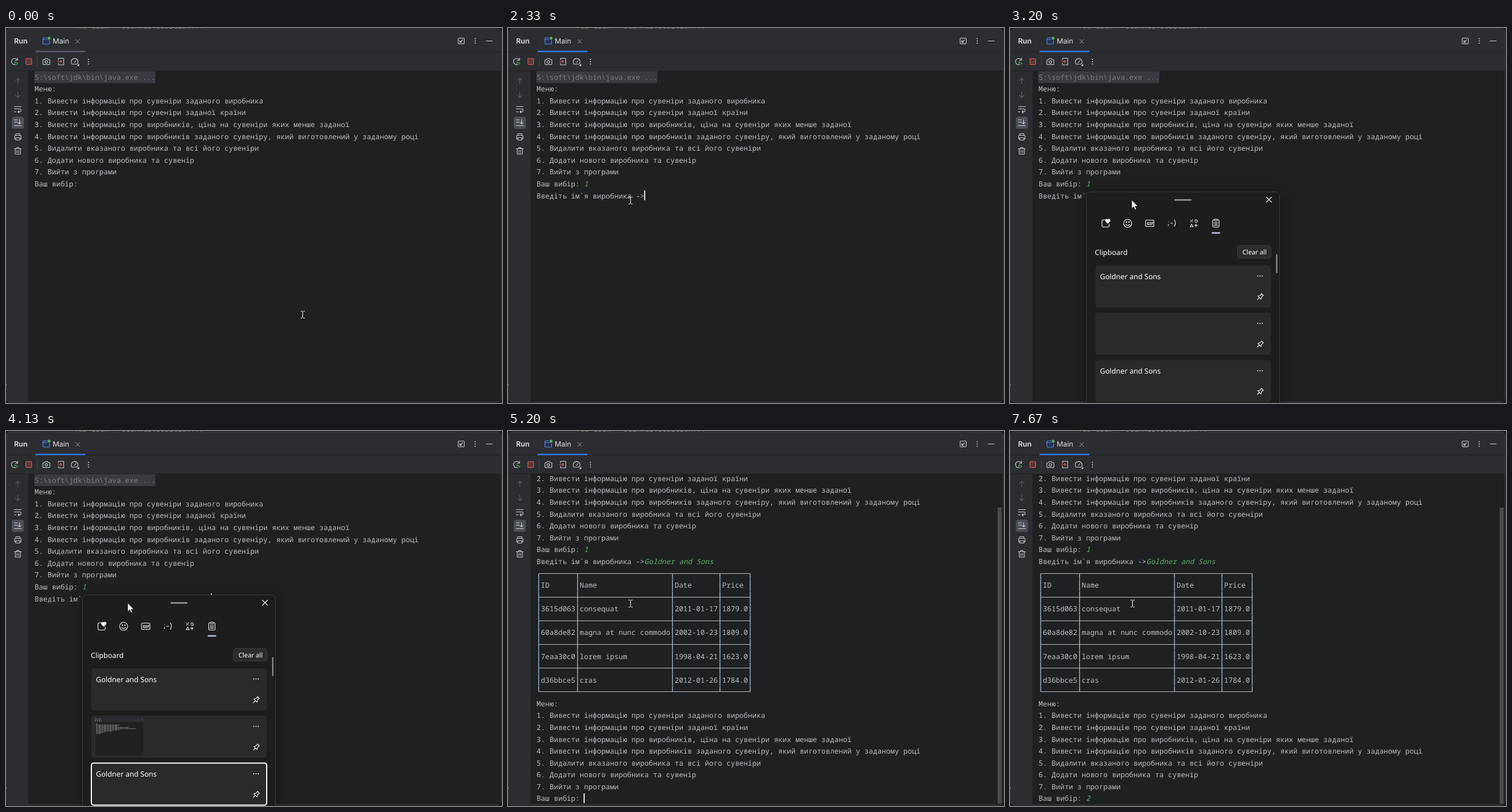
Recreate the animation shown at these times as an HTML page. Size 860 by 651 pixels, loop 8 s.

```html
<!DOCTYPE html>
<html lang="uk">
<head>
<meta charset="utf-8">
<title>Run</title>
<style>
  html, body { margin: 0; width: 100%; height: 100%; overflow: hidden; background: #1e2022; }
  svg { display: block; width: 860px; height: 651px; }
  text { white-space: pre; text-rendering: geometricPrecision; }
  .mono { font: 500 12.472px "Noto Sans Mono", monospace; fill: #bcbec4; }
  .input { font-style: italic; fill: #5fad65; }
  .ui { font: 12.46px Inter, sans-serif; fill: #dfe1e5; }
  .win { font: 12.6px "Noto Sans", sans-serif; fill: #fff; }
  .icon { fill: none; stroke: #ced0d6; stroke-width: 1.1; stroke-linecap: round; stroke-linejoin: round; }
  .dim { stroke: #5a5d63; }
  .red { stroke: #db5c5c; }
  .green { stroke: #57965c; }
  .dots { fill: #ced0d6; stroke: none; }
  #popup .icon { stroke: #f2f2f2; }
  #frame { filter: drop-shadow(0 4px 9px rgba(0, 0, 0, .4)); }
</style>
</head>
<body>
<svg viewBox="0 0 860 651">
  <defs>
    <clipPath id="view"><rect x="39" y="75" width="818" height="573"/></clipPath>
    <g id="more"><circle cx="-4" r="1"/><circle r="1"/><circle cx="4" r="1"/></g>
    <path id="beam" d="M-3.500-6H-1M1-6H3.500M0-5.500V5.500M-3.500 6H-1M1 6H3.500" fill="none" stroke="#fff"/>
  </defs>

  <rect width="860" height="651" fill="#1e2022"/>
  <text class="mono" x="118" y="1" opacity=".6"><tspan fill="#cf8e6d">for</tspan> each = scanner.position();</text>
  <rect x=".5" y="1.5" width="858" height="648" rx="7" fill="#2b2d30" stroke="#393b40"/>
  <path d="M1 41.5H858M1 74.5H858" stroke="#1e2022"/>
  <rect x="39" y="75" width="819" height="573" fill="#1e2022"/>
  <rect y="618" width="1" height="3" fill="#888"/>

  <text class="ui" x="14" y="27" style="font-weight:600">Run</text>
  <text class="ui" x="81" y="27">Main</text>
  <rect id="underline" x="51" y="39.600" width="87" height="2.400" rx="1"/>
  <g class="icon">
    <rect x="64" y="17" width="11.5" height="11" rx="1.5" stroke="#548af7" fill="#25324d"/>
    <path d="M64 20H75.5" stroke="#548af7"/>
    <circle cx="74.7" cy="17.7" r="3.2" fill="#57a55c" stroke="#2b2d30"/>
    <path d="M121 20L127.500 26.500M127.500 20L121 26.500" stroke="#6f737a"/>
    <rect x="784" y="17.500" width="10.500" height="10" rx="1.500"/>
    <path d="M791.500 20.500L787 25M787 21.500V25H790.500M832.500 22.500H843"/>
    <path d="M54.500 49V67" stroke="#43454a"/>
    <path d="M15.500 63.500A5.300 5.300 0 1 1 19.500 55.500M20 52V56H16"/>
    <path class="green" fill="#253627" d="M15.500 58.500V64.500L21 61.500Z"/>
    <rect class="red" x="34.500" y="53" width="10" height="10.500" rx="1.500" fill="#5e3838"/>
    <path d="M64.500 55H67L68.200 53H71.800L73 55H75.500Q76 55 76 56V62.500Q76 63.500 75 63.500H65Q64 63.500 64 62.500V56Q64 55 64.500 55Z"/>
    <circle cx="70" cy="59" r="2.200"/>
    <path d="M91 55.500V53Q91 52.500 91.500 52.500H100V64H91.500Q91 64 91 63.500V61"/>
    <path class="red" d="M89.500 58.300H96.500M94.300 56L96.600 58.300 94.300 60.600"/>
    <path d="M114.500 62.800A6 6 0 1 1 123.500 62.800ZM118.500 60L121.500 56.500"/>
    <path d="M127 62V66H123Z" class="dots"/>
    <path class="dim" d="M20.500 97V87M16.500 91L20.500 87 24.500 91M20.500 111V121M16.500 117L20.500 121 24.500 117"/>
    <path d="M14.500 136.500H26.500M14.500 140.500H24.500A2.600 2.600 0 0 1 24.500 145.500H21M22.800 143.500L20.800 145.500 22.800 147.500M14.500 145.500H17.500"/>
    <rect x="10" y="154" width="21" height="21" rx="4" fill="#4c4f56" stroke="none"/>
    <path d="M14.500 159.500H19.500M14.500 163.500H19.500M14.500 169.500H26.500M23.500 159V166M21 163.800L23.500 166.300 26 163.800"/>
    <path d="M17 186.500V183.500H24V186.500M17 192.500H15V187.500Q15 186.500 16 186.500H25Q26 186.500 26 187.500V192.500H24M17 190.500H24V194.500H17Z"/>
    <path d="M14.500 209.500H26.500M18.500 209V207.500H22.500V209M16 210V218Q16 219 17 219H24Q25 219 25 218V210M19 212.500V216.500M22 212.500V216.500"/>
  </g>
  <use href="#more" class="dots" transform="translate(813.500 22.500) rotate(90)"/>
  <use href="#more" class="dots" transform="translate(143 58.500) rotate(90)"/>

  <g clip-path="url(#view)">
    <g id="console">
      <rect x="49" y="75" width="210" height="20.500" fill="#393b40"/>
      <path id="grid" fill="none" stroke="#bcbec4"/>
      <path id="bars" fill="none" stroke="#a9c4da" stroke-width="1.300"/>
    </g>
    <rect id="scrollbar" x="849" y="133" width="7" height="514" fill="#4a4b4e"/>
    <rect id="caret" width="2" height="17" fill="#dfe1e5"/>
  </g>

  <g id="popup">
    <rect id="frame" x="132.500" y="284.500" width="335" height="390" rx="7" fill="#1c1d1d" stroke="#3b3c3c"/>
    <rect x="285" y="297.300" width="30" height="2.500" rx="1.200" fill="#9a9a9a"/>
    <rect x="349.500" y="354.500" width="15" height="2.600" rx="1.300" fill="#b8c3ec"/>
    <g class="icon">
      <path d="M444.500 293.500L453.500 302.500M453.500 293.500L444.500 302.500"/>
      <path d="M165 333H162Q159.500 333 159.500 335.500V343Q159.500 345.500 162 345.500H169.500Q172 345.500 172 343V340"/>
      <path d="M169.500 339L165.800 335.300Q165 332.500 167 332 168.500 331.700 169.500 333 170.800 331.500 172.300 332 174.200 333 173.200 335.300Z" fill="#fff"/>
      <circle cx="204" cy="339" r="7"/>
      <path d="M200.500 341Q204 344.500 207.500 341"/>
      <circle cx="201.700" cy="337" r=".6"/><circle cx="206.300" cy="337" r=".6"/>
      <rect x="235" y="333.500" width="14.500" height="11" rx="2"/>
      <path d="M275 336V336.300M275 341L274.300 343M278.500 339H282M285 333Q288.500 338.500 285 344.500"/>
      <path d="M313 337L317 332.500M313 333.200H313.500M316.500 336.500H317M320.500 335A2.300 2.300 0 0 1 324.500 333.800M325 334.500A2.300 2.300 0 0 1 321 336.500M312.500 345L315 340.500 317.500 345ZM320 342.500H325M322.500 340V345"/>
      <rect x="351.500" y="333" width="11" height="12.500" rx="1.500"/>
      <rect x="354.500" y="331.700" width="5" height="2.500" rx="1" fill="#1c1d1d"/>
      <path d="M354 337H360M354 339.700H360M354 342.400H360"/>
    </g>
    <text class="win" x="237" y="341.700" style="font-size:7px;font-weight:700">GIF</text>
    <text class="win" x="147" y="394" style="font-size:12.500px;font-weight:500">Clipboard</text>
    <rect x="394.500" y="377.500" width="58" height="22" rx="4" fill="#2b2c2c" stroke="#3b3c3c"/>
    <text class="win" x="403" y="393" style="font-size:11.200px">Clear all</text>
    <rect x="461.500" y="392.500" width="2" height="33" rx="1" fill="#a0a0a0"/>
    <g id="cards"></g>
    <g id="thumb">
      <rect x="153" y="498" width="85" height="65" fill="#1e2022"/>
      <path d="M153 498H238V505H155V563H153Z" fill="#2b2d30"/>
      <path d="M155 500H164M154 503H166M236 500H237" stroke="#999" stroke-dasharray="2 1.500"/>
      <path id="tiny" stroke="#a5a7ab" stroke-width=".8" stroke-dasharray="3 .7 5 .7"/>
    </g>
    <rect id="ring" x="148" width="304" height="73" rx="4" fill="none" stroke="#fff" stroke-width="2"/>
  </g>

  <use id="ibeam" href="#beam"/>
  <path id="arrow" d="M211 298.500V313.500L214.500 310.300 216.900 315.800 219.200 314.800 216.900 309.500H221.700Z" fill="#fff" stroke="#000" stroke-width=".7"/>
</svg>

<script>
const LOOP = 8000, LEFT = 49.5, ADVANCE = 7.483, PITCH = 20.58, SCROLL = -64.6;
const $ = id => document.getElementById(id);
const show = (el, on) => { el.style.display = on ? '' : 'none'; };
const lineY = row => 85.3 + row * PITCH;

function svg(tag, attrs, parent, text = '') {
  const el = document.createElementNS('http://www.w3.org/2000/svg', tag);
  for (const key in attrs) el.setAttribute(key, attrs[key]);
  el.textContent = text;
  return parent.appendChild(el);
}

const menu = [
  'Меню:',
  '1. Вивести інформацію про сувеніри заданого виробника',
  '2. Вивести інформацію про сувеніри заданої країни',
  '3. Вивести інформацію про виробників, ціна на сувеніри яких менше заданої',
  '4. Вивести інформацію про виробників заданого сувеніру, який виготовлений у заданому році',
  '5. Видалити вказаного виробника та всі його сувеніри',
  '6. Додати нового виробника та сувенір',
  '7. Вийти з програми',
  'Ваш вибір: '
];
const table = [
  ['ID', 'Name', 'Date', 'Price'],
  ['3615d063', 'consequat', '2011-01-17', '1879.0'],
  ['60a8de82', 'magna at nunc commodo', '2002-10-23', '1809.0'],
  ['7eaa30c0', 'lorem ipsum', '1998-04-21', '1623.0'],
  ['d36bbce5', 'cras', '2012-01-26', '1784.0']
];
const company = 'Goldner and Sons';
const widths = [8, 21, 10, 6];
const tableRow = 11, resultTime = 5200;

// Everything that appears in the console at a given time.
const timed = [];
function print(row, text, time = 0, col = 0, cls = 'mono') {
  const el = svg('text', { x: LEFT + col * ADVANCE, y: lineY(row) + 4.4, class: cls }, $('console'), text);
  timed.push([el, time]);
  return el;
}

print(0, 'S:\\soft\\jdk\\bin\\java.exe ...').style.fill = '#7a7e85';
menu.forEach((line, i) => print(1 + i, line));
print(9, '1', 2070, 11, 'mono input');
print(10, 'Введіть ім`я виробника ->', 2330);
print(10, company, 4070, 25, 'mono input');
table.forEach((cells, i) => {
  const line = cells.map((cell, c) => ' ' + cell.padEnd(widths[c])).join('');
  print(tableRow + 1 + 2 * i, line, resultTime);
});
menu.forEach((line, i) => print(22 + i, line, resultTime));
print(30, '2', 7070, 11, 'mono input');

// Horizontal rules sit on whole pixels after scrolling.
const barX = [0, 9, 31, 42, 49].map(col => LEFT + (col + .5) * ADVANCE);
const ruleY = i => Math.floor(lineY(tableRow + 2 * i) + SCROLL) + .5 - SCROLL;
let grid = '', bars = '';
for (let i = 0; i < 6; i++) {
  const y = ruleY(i);
  grid += `M${barX[0]} ${y}H${barX[4]}`;
  for (const x of barX) {
    bars += `M${x} ${i ? y - 10 : y}V${i < 5 ? y + 10 : y}`;
    if (i < 5) bars += `M${x} ${y + 10.6}V${y + 30.6}`;
  }
}
$('grid').setAttribute('d', grid);
$('bars').setAttribute('d', bars);
for (const id of ['grid', 'bars', 'scrollbar']) timed.push([$(id), resultTime]);

for (let i = 0; i < 3; i++) {
  const y = 412 + 82.2 * i, g = $('cards');
  svg('rect', { x: 148, y, width: 304, height: 73, rx: 5, fill: '#292a2a' }, g);
  if (i !== 1) svg('text', { x: 156, y: y + 24, class: 'win' }, g, company);
  svg('use', { href: '#more', fill: '#f2f2f2', transform: `translate(433.5 ${y + 18.5})` }, g);
  svg('path', {
    class: 'icon',
    transform: `translate(433.5 ${y + 55}) rotate(45)`,
    d: 'M-2.5-6H2.5M-2-6V-1.500L-4 1.500H4L2-1.500V-6M0 1.500V6.500'
  }, g);
}
$('tiny').setAttribute('d', menu.map((line, i) =>
  `M156 ${508.3 + 2.1 * i}h${line.length * .78}`).join(''));

// Time, x, y; a missing position hides the caret.
const caretSteps = [
  [0], [1270, 131, 262], [2070, 138, 262], [2130, 50, 282], [2330, 236, 282],
  [2800], [3270, 236, 282], [4070], [4130, 355, 282], [4870, 50, 303],
  [5200, 131, 629], [6130], [6600, 131, 629], [7070, 138, 629], [7670]
];
// Time, vertical offset, opacity.
const popupSteps = [[2930, 80, .45], [3000, 32, .8], [3070, 10, 1], [3130, 0, 1]];
const ringSteps = [[3400, 0], [3530, 1], [3600, 2]];
const at = (steps, t) => steps.filter(step => step[0] <= t).pop();

function mouse(t) {
  if (t < 730) return [514.5, 497.5];
  if (t >= 1330) return [212.5, 299.5];
  if (t >= 1270) return [220.5, 299.5];
  const k = Math.min(7, 1 + Math.floor((t - 730) / 66.7)) / 7;
  const ease = k * k * (3 - 2 * k);
  return [514.5 - 281 * ease, 497.5 - 199 * ease];
}

function draw(t) {
  for (const [el, time] of timed) show(el, t >= time);
  $('console').setAttribute('transform', `translate(0 ${t >= resultTime ? SCROLL : 0})`);
  $('underline').setAttribute('fill', t < 1130 ? '#575a6b' : '#3574f0');

  const [, caretX, caretY] = at(caretSteps, t);
  show($('caret'), caretX);
  if (caretX) {
    $('caret').setAttribute('x', caretX);
    $('caret').setAttribute('y', caretY);
  }

  const open = t >= 2930 && t < 4330;
  show($('popup'), open);
  show($('arrow'), open);
  show($('ibeam'), !open);
  $('ibeam').setAttribute('transform', `translate(${mouse(t)})`);
  if (open) {
    const [, offset, opacity] = at(popupSteps, t);
    $('popup').setAttribute('transform', `translate(0 ${offset})`);
    $('popup').setAttribute('opacity', opacity);
    show($('thumb'), t >= 3270);
    const ring = at(ringSteps, t);
    show($('ring'), ring);
    if (ring) $('ring').setAttribute('y', 412 + 82.2 * ring[1]);
  }
}

const start = performance.now();
function tick() {
  draw((performance.now() - start) % LOOP);
  requestAnimationFrame(tick);
}
tick();
</script>
</body>
</html>
```
